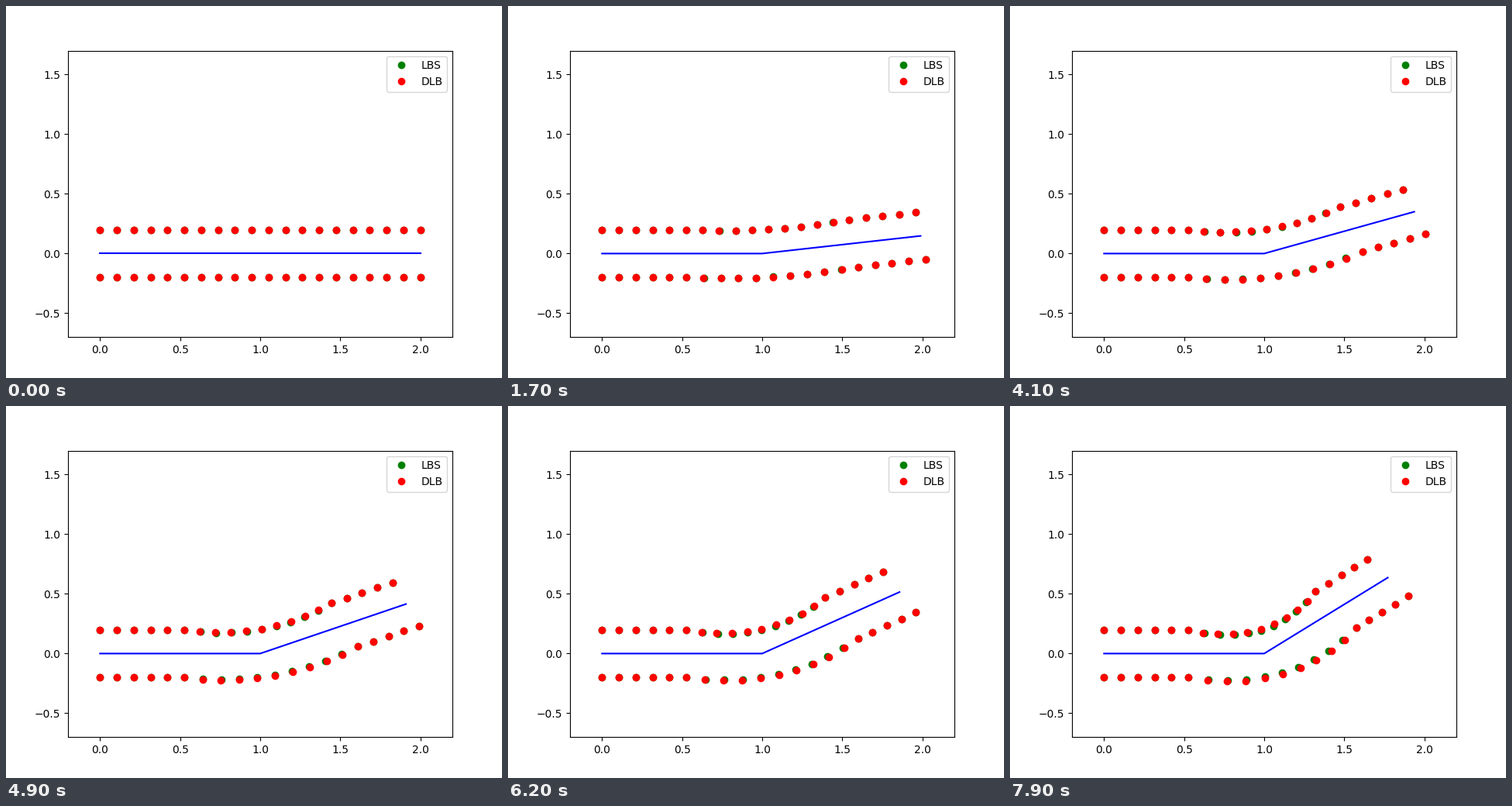
Write a matplotlib script that moves like this. It is 640 px wide and 480 px high and loops after 8 s.

```python
import numpy as np
import matplotlib.pyplot as plt
from matplotlib.animation import FuncAnimation

FRAMES = 80
STEP = np.pi / 360
JOINT = np.array([1.0, 0.0])

# Skin points: one row above the bones and one below.
cols = np.arange(20)
xs = np.linspace(0, 2, 20)
rest = np.vstack([np.column_stack([xs, np.full(20, y)]) for y in (0.2, -0.2)])
weights = np.tile(np.clip((cols - 5) / 10, 0, 1), 2)


def rotate(points, angle):
    """Rotate points about the joint; angle may differ per point."""
    x, y = (points - JOINT).T
    c, s = np.cos(angle), np.sin(angle)
    return JOINT + np.column_stack([c * x - s * y, s * x + c * y])


def linear_blend(angle):
    w = weights[:, None]
    return (1 - w) * rest + w * rotate(rest, angle)


def dual_blend(angle):
    # Normalised blend of two half-angle rotors sharing the same centre.
    half = angle / 2
    blended = np.arctan2(weights * np.sin(half),
                         1 - weights + weights * np.cos(half))
    return rotate(rest, 2 * blended)


fig, ax = plt.subplots(figsize=(6.4, 4.8), dpi=100)
ax.set_xlim(-0.2, 2.2)
ax.set_ylim(-0.7, 1.7)
bones, = ax.plot([], [], "b-")
lbs, = ax.plot([], [], "go", label="LBS")
dlb, = ax.plot([], [], "ro", label="DLB")
ax.legend(loc="upper right")


def update(i):
    angle = i * STEP
    tip = JOINT + [np.cos(angle), np.sin(angle)]
    bones.set_data([0, JOINT[0], tip[0]], [0, JOINT[1], tip[1]])
    lbs.set_data(*linear_blend(angle).T)
    dlb.set_data(*dual_blend(angle).T)
    return bones, lbs, dlb


anim = FuncAnimation(fig, update, frames=FRAMES, interval=100,
                     repeat=True, repeat_delay=0)
plt.show()
```
